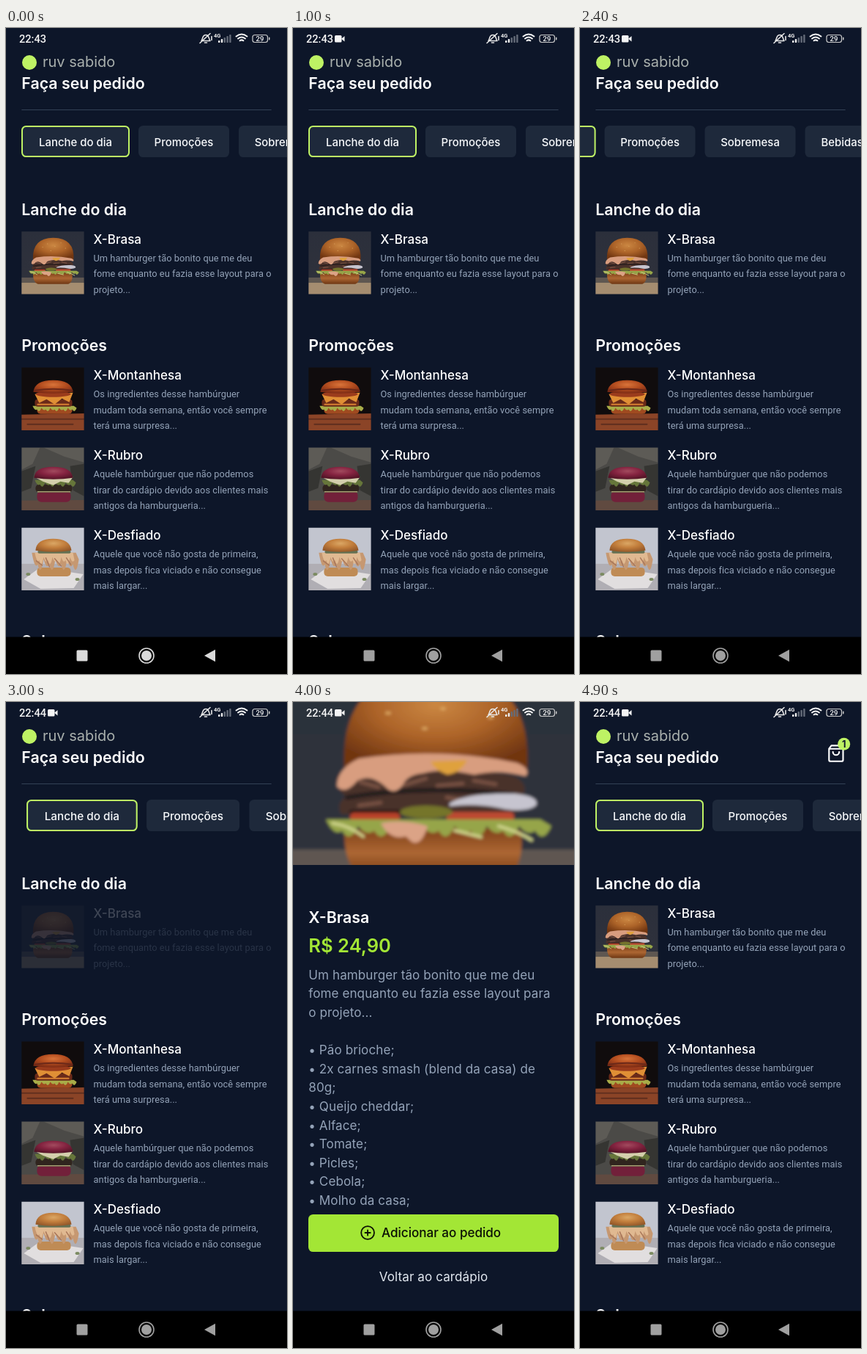
These frames come from a looping animation (384 px wide and 880 px high, 5 s). An HTML page:

```html
<!DOCTYPE html>
<html lang="pt-BR">
<head>
<meta charset="utf-8">
<title>Cardápio</title>
<style>
html, body { margin: 0; width: 100%; height: 100%; overflow: hidden; background: #0d1629; }
svg { display: block; width: 100vw; height: 100vh; font-family: Inter, sans-serif; }
svg svg { width: 384px; height: 222px; }
.plain { font-family: Roboto, sans-serif; }
.note { letter-spacing: .05px; }
.body { letter-spacing: .08px; }
.thumb { clip-path: inset(0 round 6.4px); }
.line { fill: none; stroke-linecap: round; stroke-linejoin: round; }
</style>
</head>
<body>
<svg id="stage" viewBox="0 0 384 880"></svg>
<script>
const LOOP = 5000, BG = '#0d1629', LIME = '#a3e635', PALE_LIME = '#bef264', SLATE = '#94a3b8';

const text = (x, y, str, size, weight = 400, fill = '#fff', extra = '') =>
  `<text x="${x}" y="${y}" font-size="${size}" font-weight="${weight}" fill="${fill}" ${extra}>${str}</text>`;
const rect = (x, y, w, h, fill, r = 0, extra = '') =>
  `<rect x="${x}" y="${y}" width="${w}" height="${h}" rx="${r}" fill="${fill}" ${extra}/>`;
const oval = (x, y, rx, ry, fill) => `<ellipse cx="${x}" cy="${y}" rx="${rx}" ry="${ry}" fill="${fill}"/>`;
const path = (d, fill, extra = '') => `<path d="${d}" fill="${fill}" ${extra}/>`;
const stroke = (d, color, width, extra = '') =>
  `<path class="line" d="${d}" stroke="${color}" stroke-width="${width}" ${extra}/>`;
const stops = colors => colors.map((c, i) => `<stop offset="${i / (colors.length - 1)}" stop-color="${c}"/>`).join('');
const linear = (id, ...colors) => `<linearGradient id="${id}" x2="0" y2="1">${stops(colors)}</linearGradient>`;
const radial = (id, ...colors) => `<radialGradient id="${id}" cy=".35" r=".66">${stops(colors)}</radialGradient>`;
const backdrop = (size, fill) => rect(-size * .08, -size * .08, size * 1.16, size * 1.16, fill);
const photo = (id, size, shapes) =>
  `<filter id="${id}-soft"><feGaussianBlur stdDeviation="${size / 200}"/></filter>` +
  `<symbol id="${id}" viewBox="0 0 ${size} ${size}"><g filter="url(#${id}-soft)">${shapes}</g></symbol>`;

// Wavy band, used for lettuce and torn meat
const ruffle = (x0, x1, y, h, step, fill) => {
  let d = `M${x0} ${y}`;
  for (let x = x0, i = 0; x < x1; x += step, i++)
    d += `Q${x + step / 2} ${y + h * (i % 2 ? 1.3 : .9)} ${x + step} ${y + h * (i % 2 ? .35 : .6)}`;
  return path(d + `L${x1} ${y}Z`, fill);
};

const photos =
  linear('wall', '#2b2f3b', '#30323c') + linear('heel', '#7c3e18', '#ad6733', '#6d3613') +
  radial('bun', '#cb8742', '#ad6429', '#713611') + radial('ember', '#d9743a', '#b34d1f', '#7a2a14') +
  radial('wine', '#a24a5e', '#842340', '#531426') + radial('golden', '#dba765', '#c27e3c', '#95592a') +
  photo('classic', 384,
    backdrop(384, 'url(#wall)') + rect(-30, 282, 444, 132, '#5f5751') + rect(-30, 314, 444, 100, '#a58d70') +
    path('M70 256Q190 246 312 256Q316 312 288 322L100 322Q70 312 70 256Z', 'url(#heel)') +
    path('M62 180Q110 168 200 172T306 184Q324 196 312 212Q318 224 306 232L66 234Q58 220 72 210Q56 196 62 180Z', '#49312a') +
    stroke('M74 211Q180 193 300 207', '#241a1b', 6) + stroke('M80 231H160', '#231819', 6) +
    stroke('M92 190l25 7m35-3l30-9m15 10l35-3m15-4l30 5M90 222l30-4m90-7l40 7', '#775143', 5) +
    rect(78, 232, 68, 12, '#b9432c', 5) + rect(210, 231, 92, 13, '#bd4a31', 5) + oval(182, 231, 36, 9, '#75742c') +
    path('M214 219Q240 204 304 206Q338 210 332 222Q320 231 290 227Q250 218 214 223Z', '#c6c4cf') +
    ruffle(45, 338, 241, 26, 22, '#96a548') + stroke('M54 246q24 4 42 18m30-14l40 4m55 2l36 9m24-15q28 8 45 19', '#cfd48b', 4) +
    path('M120 246Q150 240 184 250Q176 277 163 272L154 264Q132 270 120 246Z', '#dba386') +
    path('M70 170Q64 40 195 38Q328 40 320 172Q200 148 70 170Z', 'url(#bun)') +
    path('M60 196Q60 172 90 158Q200 142 306 164Q326 172 318 182Q280 172 248 180Q204 170 178 178Q156 180 150 194Q138 210 126 196Q106 178 88 188Q72 208 60 196Z', '#d89d7f') +
    path('M188 162L238 160Q230 177 211 180Q194 174 188 162Z', '#dfa13e') +
    [[130, 96], [160, 75], [205, 90], [242, 70], [270, 102], [180, 117]].map(([x, y]) => oval(x, y, 4, 2, '#dca761')).join('')) +
  photo('smoky', 85,
    backdrop(85, '#100c0d') + path('M-7 64L92 62V92H-7Z', '#8b4427') +
    stroke('M0 70H85M8 77H70', '#63301f', 2) + rect(21, 50, 48, 13, '#a04a20', 5) +
    ruffle(15, 71, 52, 8, 6, '#a8ac48') + rect(18, 43, 51, 10, '#6a2a19', 4) + stroke('M22 50H64', '#d88032', 2) +
    path('M18 36L70 34L65 47L55 42L45 50L34 43L24 48Z', '#e08f35') +
    oval(43, 36, 24, 4, '#9b3c1c') + path('M16 33Q18 17 43 17Q68 17 70 33Q42 37 16 33Z', 'url(#ember)') +
    stroke('M18 31Q43 27 69 31', '#6c2919', 2)) +
  photo('ruby', 85,
    backdrop(85, '#4b4a47') + path('M0 0H25L15 22L0 30ZM30 0H85V20L58 12Z', '#5d5b56') +
    path('M0 32L19 25L13 55L0 60ZM66 25L85 22V66L70 58Z', '#353532') + path('M-7 72L92 71V92H-7Z', '#604a40') +
    rect(21, 59, 46, 15, '#72203a', 6) + rect(19, 50, 50, 11, '#30251e', 5) + stroke('M22 60H66', '#a9a274', 1.5) +
    ruffle(18, 70, 44, 10, 7, '#66763a') + path('M18 40L70 40L64 48L53 46L43 51L29 46Z', '#d4cfac') +
    path('M17 41Q18 26 43 26Q68 26 70 41Q43 45 17 41Z', 'url(#wine)')) +
  photo('shredded', 85,
    backdrop(85, '#c2c5cf') + rect(-7, 49, 99, 43, '#b0aeb4') +
    path('M3 70L25 54L84 63L71 82L26 83Z', '#e1dedf') + rect(21, 54, 46, 12, '#bf8b55', 5) +
    ruffle(14, 74, 34, 26, 8, '#c69871') + ruffle(18, 70, 34, 17, 6, '#e0b991') +
    stroke('M20 45l8 6m5-10l5 12m7-11l9 10m7-11l6 9', '#a9775a', 1.5) +
    rect(22, 31, 45, 4, '#647052', 2) + path('M19 31Q20 15 43 15Q66 15 68 31Q43 35 19 31Z', 'url(#golden)') +
    oval(9, 63, 3, 2, '#7c8b62') + oval(76, 70, 3, 2, '#7c8b62'));

const row = (y, img, title, lines) =>
  `<use class="thumb" href="#${img}" x="21.3" y="${y}" width="85.3" height="85.3"/>` +
  text(119.5, y + 16.4, title, 17.07, 500) +
  lines.map((s, i) => text(119.5, y + 40.7 + i * 21.33, s, 12.8, 400, SLATE, 'class="plain note"')).join('');

const tab = (x, w, label, active) =>
  rect(x, 133, w, 43, '#1e293b', 6.4) +
  (active ? rect(x + 1, 134, w - 2, 41, 'none', 5.4, `stroke="${PALE_LIME}" stroke-width="2"`) : '') +
  text(x + w / 2, 160.6, label, 14.93, 500, '#f8fafc', 'text-anchor="middle"');

const home = `<g id="home">` +
  `<circle cx="32" cy="47" r="10" fill="${PALE_LIME}"/>` + text(50, 53, 'ruv sabido', 20, 400, '#a9b0ad') +
  text(21.3, 82.8, 'Faça seu pedido', 21.33, 600) + rect(21.3, 111, 341.4, 1, '#334155') +
  `<g id="tabs">` + tab(21, 148, 'Lanche do dia', true) + tab(181, 124, 'Promoções') +
  tab(318, 124, 'Sobremesa') + tab(455, 101, 'Bebidas') + `</g>` +
  text(21.3, 254.6, 'Lanche do dia', 21.33, 600) +
  `<g id="pressed">` + row(277.3, 'classic', 'X-Brasa',
    ['Um hamburger tão bonito que me deu', 'fome enquanto eu fazia esse layout para o', 'projeto...']) + `</g>` +
  text(21.3, 440.4, 'Promoções', 21.33, 600) +
  row(462.6, 'smoky', 'X-Montanhesa',
    ['Os ingredientes desse hambúrguer', 'mudam toda semana, então você sempre', 'terá uma surpresa...']) +
  row(571.6, 'ruby', 'X-Rubro',
    ['Aquele hambúrguer que não podemos', 'tirar do cardápio devido aos clientes mais', 'antigos da hamburgueria...']) +
  row(680.7, 'shredded', 'X-Desfiado',
    ['Aquele que você não gosta de primeira,', 'mas depois fica viciado e não consegue', 'mais largar...']) +
  text(21.3, 842.5, 'Sobremesa', 21.33, 600) +
  `<g id="cart">` +
  stroke('M6 2 3 6v14a2 2 0 0 0 2 2h14a2 2 0 0 0 2-2V6l-3-4zM3 6h18M16 10a4 4 0 0 1-8 0', '#fff', 2,
    'transform="translate(337.1 57.3) scale(1.067)"') +
  `<circle cx="360.7" cy="57.3" r="8.5" fill="${PALE_LIME}"/>` +
  text(360.7, 61.9, '1', 12.8, 700, '#0f172a', 'text-anchor="middle"') + `</g></g>`;

const details = ['Um hamburger tão bonito que me deu', 'fome enquanto eu fazia esse layout para', 'o projeto...', '',
  '• Pão brioche;', '• 2x carnes smash (blend da casa) de', '80g;', '• Queijo cheddar;', '• Alface;', '• Tomate;',
  '• Picles;', '• Cebola;', '• Molho da casa;'];

const product = `<g id="product">` + rect(0, 0, 384, 830, BG) +
  `<svg width="384" height="222" viewBox="0 81 384 222"><use href="#classic" width="384" height="384"/></svg>` +
  text(21.3, 300.6, 'X-Brasa', 21.33, 600) + text(21.3, 341.3, 'R$ 24,90', 25.6, 600, LIME) +
  details.map((s, i) => text(21.3, 377.8 + i * 25.6, s, 17.07, 400, SLATE, 'class="body"')).join('') +
  `<g id="button">` + rect(21, 698, 342, 51, LIME, 6.4) +
  stroke('M111 723a8.9 8.9 0 1 1-17.8 0a8.9 8.9 0 1 1 17.8 0M102.1 719.4v7.2M98.5 723h7.2', '#0b1005', 1.8) +
  text(121, 729.4, 'Adicionar ao pedido', 17.07, 500, '#0b1005') + `</g>` +
  text(192, 789.4, 'Voltar ao cardápio', 17.07, 400, '#e2e8f0', 'class="body" text-anchor="middle"') + `</g>`;

const status = `<g class="plain">` + text(18, 20, '22:43', 14.6, 500, '#f4f4f4', 'id="clock"') +
  `<g id="camera">` + rect(57, 10, 9.5, 9.5, '#f4f4f4', 1.5) + path('M66 14.7L70.5 11V18.5Z', '#f4f4f4') + `</g>` +
  stroke('M267 17.5c2-2 1-8 6-8s4 6 6 8zM271.5 20h3M265 20.5L279 7.5M281 11.5v5', '#e8e8e8', 1.6) +
  text(284, 13, '4G', 7.5, 700, '#eee') +
  [0, 1, 2, 3, 4].map(i => rect(290 + i * 3.8, 17 - i * 2, 2.4, 3 + i * 2, i < 2 ? '#eee' : '#646b78', .7)).join('') +
  stroke('M314.5 11.5q7.5-6 15 0M317 14.5q5-4 10 0M319.6 17.3q2.4-1.8 4.8 0', '#f4f4f4', 2) +
  rect(337, 9.5, 20.5, 10, 'none', 3, 'stroke="#ccc" stroke-width="1.2"') + rect(359, 12.5, 1.5, 4, '#ccc', .7) +
  text(347, 18, '29', 9.5, 500, '#f4f4f4', 'text-anchor="middle"') + `</g>`;

const nav = rect(0, 829.5, 384, 51, '#000') + `<g id="nav">` + rect(96.5, 847.5, 15, 15, 'currentColor', 1.5) +
  oval(192, 855, 7, 7, 'currentColor') + stroke('M202 855a10 10 0 1 1-20 0a10 10 0 1 1 20 0', 'currentColor', 1.6) +
  path('M271 855L286 846.8V863.2Z', 'currentColor') + `</g>`;

const stage = document.getElementById('stage');
stage.innerHTML = `<defs>${photos}</defs>` + rect(0, 0, 384, 880, BG) + home + product + status + nav;

const el = Object.fromEntries([...stage.querySelectorAll('g[id], text[id]')].map(n => [n.id, n]));
const ramp = (t, a, b) => Math.min(1, Math.max(0, (t - a) / (b - a)));
const smooth = (t, a, b) => { const p = ramp(t, a, b); return p * p * (3 - 2 * p); };
const show = (node, on) => node.setAttribute('visibility', on ? 'visible' : 'hidden');

function draw(t) {
  const scroll = 193 * (smooth(t, 1200, 1600) - smooth(t, 2300, 2620));
  const pull = t < 4200 ? smooth(t, 2600, 2700) : 0;
  el.tabs.setAttribute('transform', `translate(${6.5 * pull - scroll} 0) scale(${1 + .025 * pull} 1)`);
  el.pressed.setAttribute('opacity', t >= 2950 && t < 4200 ? .2 : 1);
  el.product.setAttribute('opacity', t < 4200 ? ramp(t, 3080, 3200) : 0);
  el.button.setAttribute('opacity', t >= 4050 ? .7 : 1);
  const grey = Math.round(218 - 58 * ramp(t, 300, 700));
  el.nav.setAttribute('color', `rgb(${grey},${grey},${grey})`);
  el.clock.textContent = t < 2950 ? '22:43' : '22:44';
  show(el.camera, t >= 100);
  show(el.cart, t >= 4200);
}

const start = performance.now();
(function tick() {
  draw((performance.now() - start) % LOOP);
  requestAnimationFrame(tick);
})();
</script>
</body>
</html>
```
